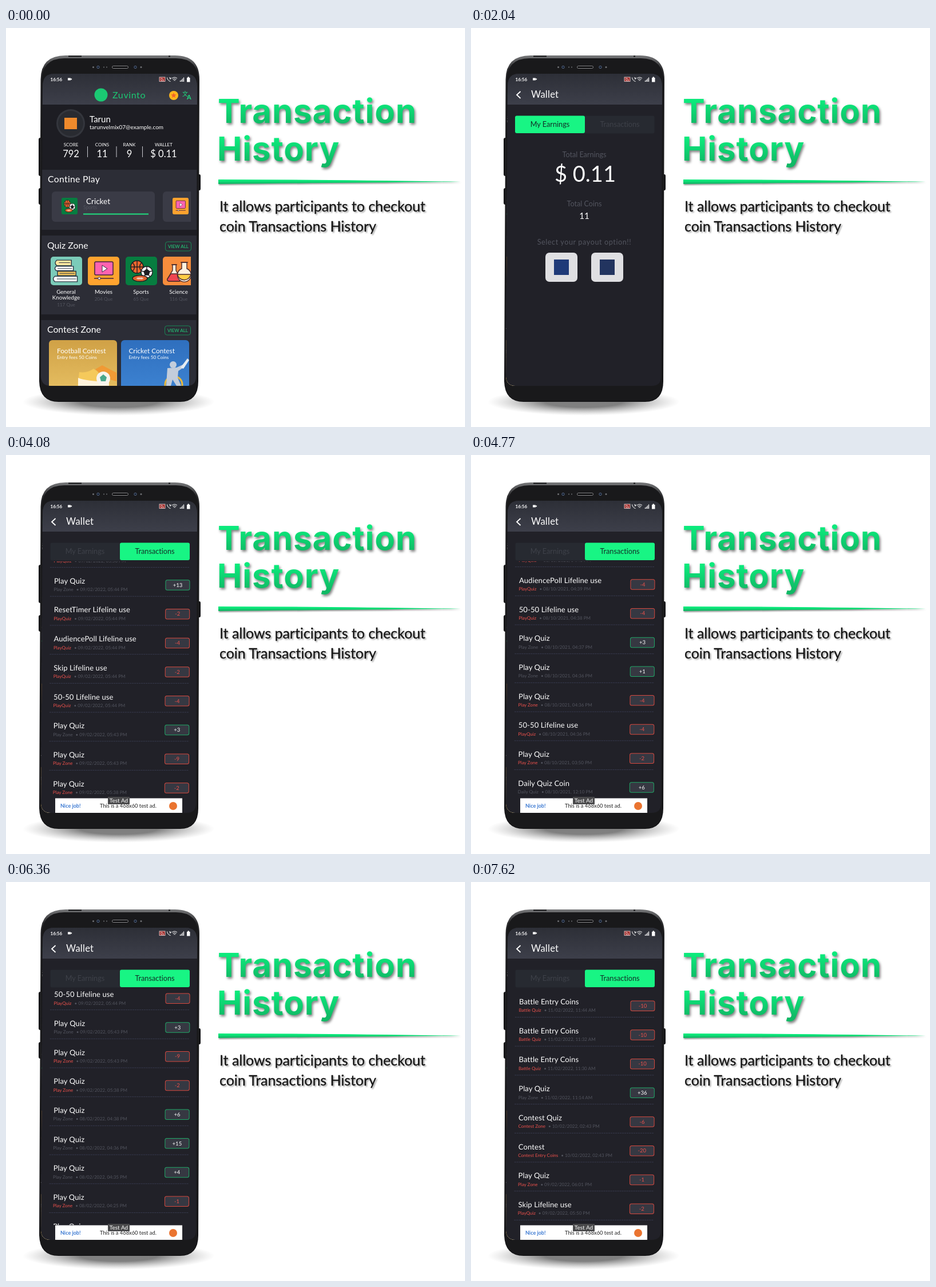
Recreate the animation shown at these times as an HTML page. Size 802 by 698 pixels, loop 8000 ms.

```html
<!DOCTYPE html>
<html lang="en">
<head>
<meta charset="utf-8">
<title>Transaction History</title>
<style>
html, body { margin: 0; width: 100%; height: 100%; overflow: hidden; background: #fff; }
svg { display: block; width: 100%; height: 100%; }
text { font-family: Lato, "Open Sans", sans-serif; font-variant-ligatures: none; fill: #fff; white-space: pre; }
.mid { text-anchor: middle; }
.dim { fill: #53555f; }
.red { fill: #ea514c; }
.title { font: 700 58px Inter, sans-serif; letter-spacing: 1px; fill: url(#green); filter: drop-shadow(2px 3px 2px rgba(0,0,0,.5)); }
.lead { font-size: 24.9px; fill: #151515; stroke: #151515; stroke-width: .3; filter: drop-shadow(2px 2px 1px rgba(0,0,0,.35)); }
.head { font-size: 15.8px; }
.view { fill: none; stroke: #1a8654; }
.row { font-size: 13px; letter-spacing: .1px; }
.sub { font-size: 8px; }
</style>
</head>
<body>
<svg viewBox="0 0 802 698">
<defs>
  <linearGradient id="green" x2="0" y2="1"><stop offset=".25" stop-color="#0cea7c"/><stop offset=".85" stop-color="#10b965"/></linearGradient>
  <linearGradient id="bar" x2="0" y2="1"><stop stop-color="#2d2f37"/><stop offset="1" stop-color="#3d3f4a"/></linearGradient>
  <linearGradient id="rim" x2="0" y2="1"><stop stop-color="#77787a"/><stop offset=".04" stop-color="#2b2b2d"/><stop offset="1" stop-color="#111113"/></linearGradient>
  <linearGradient id="gold" x2="0" y2="1"><stop stop-color="#d0a146"/><stop offset="1" stop-color="#e6bf62"/></linearGradient>
  <linearGradient id="blue" x2="0" y2="1"><stop stop-color="#2f6fbe"/><stop offset="1" stop-color="#3d83d2"/></linearGradient>
  <radialGradient id="shade"><stop offset=".4" stop-color="#555" stop-opacity=".75"/><stop offset=".75" stop-color="#777" stop-opacity=".3"/><stop offset="1" stop-color="#999" stop-opacity="0"/></radialGradient>
  <clipPath id="screen"><path d="M64 102Q64 80 84 80H314Q334 80 334 102L332 610Q332 626 316 626H78Q62 626 61 610Z"/></clipPath>
  <clipPath id="listBox"><path d="M60 186H336V600H60Z"/></clipPath>
  <clipPath id="inner"><path d="M60 80H323V626H60Z"/></clipPath>
  <symbol id="film" viewBox="0 0 55 50" preserveAspectRatio="none">
    <rect width="55" height="50" rx="5" fill="#ffa32f"/>
    <rect x="12" y="9" width="32" height="23" rx="2" fill="#ff63b0" stroke="#3b2140" stroke-width="1.5"/>
    <path d="M25 15L34 21L25 27Z" fill="#fff" stroke="#3b2140"/>
    <path d="M11 38H45" stroke="#3b2140" stroke-width="1.6"/><circle cx="20" cy="38" r="2.2" fill="#fff" stroke="#3b2140"/>
  </symbol>
  <symbol id="sport" viewBox="0 0 55 50" preserveAspectRatio="none">
    <rect width="55" height="50" rx="5" fill="#077d40"/>
    <g stroke="#1e1d22" stroke-width="1.4">
      <circle cx="20" cy="18" r="11" fill="#f0672e"/><path d="M9 18H31M20 7V29M12 10Q19 18 12 26M28 10Q21 18 28 26" fill="none"/>
      <circle cx="37" cy="27" r="10" fill="#fff"/><path d="M37 22L42 26L40 32H34L32 26ZM37 17V22M47 25L42 26M43 35L40 32M31 35L34 32M27 25L32 26" fill="#1e1d22"/>
      <ellipse cx="25" cy="38" rx="13" ry="5.5" fill="#e0642f"/><path d="M19 38H31M22 36V40M25 36V40M28 36V40" stroke="#fff" stroke-width="1"/>
    </g>
  </symbol>
</defs>

<ellipse cx="197" cy="654" rx="168" ry="24" fill="url(#shade)"/>
<path d="M57 195q0-3 3-3h3v67h-3q-3 0-3-3ZM57 283q0-3 3-3h3v29h-3q-3 0-3-3ZM336 256h2q2 0 2 3v22q0 3-2 3h-2Z" fill="#161618"/>
<path d="M60.500 90Q61 48 104 48H295Q338 48 338 90L336 618Q336 654 304 654H92Q59 654 58 618Z" fill="url(#rim)"/>
<path d="M61.500 96Q62 53 102 53H297Q337 53 337 96L335 618Q335 653 304 653H92Q60 653 59 618Z" fill="#19191b"/>
<path d="M109 49.500H132M284 49.500H287" stroke="#18181a" stroke-width="2"/>
<rect x="185.500" y="66.500" width="28" height="4" rx="2" fill="#0b0b0d" stroke="#8c8c8e"/>
<g fill="#101a2c" stroke="#5b6b86"><circle cx="161" cy="68.500" r="2.200"/><circle cx="226" cy="68.500" r="2.200"/></g>
<g fill="#707174"><circle cx="152.500" cy="68.500" r="1.500"/><circle cx="171" cy="68.500" r="1"/><circle cx="176" cy="68.500" r="1"/><circle cx="236" cy="68.500" r="1.500"/></g>

<g clip-path="url(#screen)">
  <g id="home">
    <path d="M60 80H336V626H60Z" fill="#1d1d23"/>
    <path d="M60 80H336V134H60Z" fill="url(#bar)"/>
    <path d="M60 248H336V353H60ZM60 363H336V501H60ZM60 511H336V626H60Z" fill="#2c2d36"/>
    <circle cx="166" cy="117" r="11.500" fill="#1bc873"/>
    <text x="186" y="122.500" font-size="16" letter-spacing=".6" style="fill:#1bc873">Zuvinto</text>
    <circle cx="293" cy="118" r="8" fill="#ffb61c"/>
    <path id="star" fill="#f0622b"/>
    <text x="308" y="119" font-size="10" style="fill:#1fdc7f;font-family:'Noto Sans CJK SC','Noto Sans CJK JP',sans-serif">文</text>
    <text x="316" y="125" font-size="11" font-weight="700" style="fill:#1fdc7f">A</text>
    <circle cx="113" cy="167" r="25" fill="#34363d"/><circle cx="113" cy="167" r="22" fill="#292b31"/>
    <rect x="102" y="157" width="22" height="20" fill="#ef8a2c"/>
    <text x="146" y="165" font-size="15">Tarun</text>
    <text x="146" y="177" font-size="10">tarunvelmix07@example.com</text>
    <g id="stats"></g>
    <path d="M142.500 207V226M193 207V226M238.500 207V226" stroke="#c9cad0"/>
    <text x="73" y="270" class="head" letter-spacing=".3">Contine Play</text>
    <g clip-path="url(#inner)">
      <rect x="80" y="286" width="180" height="53" rx="6" fill="#3a3b46"/>
      <rect x="274" y="286" width="90" height="53" rx="6" fill="#3a3b46"/>
      <use href="#sport" x="97" y="297" width="28" height="29"/>
      <use href="#film" x="291" y="297" width="28" height="29"/>
    </g>
    <text x="140" y="308" font-size="13.500">Cricket</text>
    <text x="135" y="317" font-size="8.500" class="dim">Sports</text>
    <path d="M135 325.500H249" stroke="#1fe080" stroke-width="1.800"/>
    <text x="72" y="385.500" class="head">Quiz Zone</text>
    <text x="72" y="532.500" class="head">Contest Zone</text>
    <rect x="278.500" y="374" width="45" height="16" rx="4" class="view"/><text x="301" y="385" font-size="8" class="mid" style="fill:#22d47d">VIEW ALL</text>
    <rect x="277.500" y="521" width="45" height="16" rx="4" class="view"/><text x="300" y="532" font-size="8" class="mid" style="fill:#22d47d">VIEW ALL</text>
    <rect x="78" y="400" width="55" height="50" rx="5" fill="#7bcbb9"/>
    <g stroke="#2c3a45" stroke-width="1.300" fill="#fff" transform="translate(105 425) scale(1.15 1.08) translate(-105 -425.500)">
      <path d="M91 408H113V417H91Q86 412.500 91 408Z" fill="#ffe6a0"/><path d="M90 418H116V425H90Q86 421 90 418Z"/>
      <path d="M92 426H120V433H92Z" fill="#f2c45d"/><path d="M88 434H122V443H88Q83 438 88 434Z"/>
      <path d="M94 412H111M92 421.500H114M95 429.500H118M91 438.500H120" stroke-width=".9"/>
    </g>
    <use href="#film" x="143" y="400" width="55" height="50"/>
    <use href="#sport" x="209" y="400" width="55" height="50"/>
    <g clip-path="url(#inner)">
      <rect x="274" y="400" width="58" height="50" rx="5" fill="#f78d3c"/>
      <g stroke="#4a2a2c" stroke-width="1.400">
        <path d="M291 414V424L282 439Q281 443 286 443H302Q306 443 305 439L297 424V414Z" fill="#fff1de"/>
        <path d="M288 430H300L305 439Q306 443 302 443H286Q281 443 282 439Z" fill="#ef4551"/><path d="M289 414H299"/>
        <path d="M307 410V421A12 12 0 1 0 316 421V410Z" fill="#fff1de"/><path d="M300 431H323A12 12 0 0 1 300 433Z" fill="#ffce45"/><path d="M305 410H318"/>
      </g>
    </g>
    <g id="cats"></g>
    <rect x="75" y="546" width="119" height="90" rx="6" fill="url(#gold)"/>
    <rect x="201" y="546" width="119" height="90" rx="6" fill="url(#blue)"/>
    <g id="contests"></g>
    <path d="M128 602Q142 604 153 596L160 601Q164 612 180 616V626H125Z" fill="#f5c95b"/>
    <path d="M126 612Q140 618 180 619V626H126Z" fill="#fff3dc"/>
    <path d="M156 597L168 590L193 603V618L174 613Z" fill="#f09a35"/>
    <circle cx="170" cy="613" r="12" fill="#f7f4ee"/><path d="M170 606L176 611L174 618H166L164 611Z" fill="#4aa78c"/>
    <circle cx="293" cy="624" r="15" fill="none" stroke="#e9b93c" stroke-width="3"/>
    <g fill="#c3cddb"><circle cx="292" cy="589" r="6"/>
      <path d="M282 595L298 594L311 588L313 592L301 600L300 612L306 626H298L291 615L288 626H280L281 609Z"/><path d="M305 594L317 578L320 581L310 596Z" fill="#e6ecf2"/></g>
  </g>

  <g id="wallet">
    <path d="M60 80H336V626H60Z" fill="#212128"/>
    <path d="M60 80H336V134H60Z" fill="url(#bar)"/>
    <path d="M86.500 111L80 117L86.500 123" fill="none" stroke="#fff" stroke-width="1.800"/>
    <text x="105" y="122" font-size="16.500" letter-spacing=".25">Wallet</text>
    <g id="earn">
      <text x="198" y="226" font-size="12.600" class="mid dim">Total Earnings</text>
      <text x="199.500" y="269" font-size="38" class="mid">$ 0.11</text>
      <text x="198" y="311.500" font-size="12.600" class="mid dim">Total Coins</text>
      <text x="198" y="334" font-size="15" class="mid">11</text>
      <text x="198" y="379" font-size="12.600" letter-spacing=".6" class="mid dim">Select your payout option!!</text>
      <rect x="130" y="393" width="56" height="51" rx="7" fill="#dfdfe2"/><rect x="145" y="405" width="26" height="27" fill="#1f3a78"/>
      <rect x="210" y="393" width="56" height="51" rx="7" fill="#dfdfe2"/><rect x="225" y="405" width="26" height="27" fill="#22345f"/>
    </g>
    <g clip-path="url(#listBox)"><g id="slide"><g transform="matrix(1 0 -.0045 1 .95 0)"><g id="list"></g></g></g></g>
    <g id="ad">
      <path d="M86 600.500H308V626H86Z" fill="#fff"/>
      <text x="95" y="616.500" font-size="9" font-weight="700" style="fill:#3c7ad2">Nice job!</text>
      <text x="164" y="617" font-size="9.300" style="fill:#222">This is a 468x60 test ad.</text>
      <rect x="178" y="598" width="38" height="13" fill="#4a4a4c"/>
      <text x="197" y="608" font-size="10" class="mid">Test Ad</text>
      <circle cx="292" cy="614" r="7" fill="#ea7430"/>
    </g>
    <rect x="77.500" y="153.500" width="243" height="31" rx="3" fill="#272a31"/>
    <rect id="thumb" y="153.500" width="122" height="30.500" rx="3" fill="#18f584"/>
    <text id="tabA" x="138" y="173" font-size="12.700" class="mid">My Earnings</text>
    <text id="tabB" x="260" y="173" font-size="12.700" class="mid">Transactions</text>
  </g>

  <text x="77.500" y="92.500" font-size="8" font-weight="700">16:56</text>
  <path d="M108 87.500H113V91.500H108ZM113 89L115 88V91L113 90Z" fill="#fff"/>
  <rect x="268" y="86" width="10" height="7.500" fill="#a32f2d" stroke="#e7dada" stroke-width=".8"/>
  <path d="M270 88Q275 88 275 93M270 90.500Q272.500 90.500 272.500 93" fill="none" stroke="#fff" stroke-width=".8"/>
  <path d="M281.500 86.500Q282 92 287.500 93.500M285 86L288 89M288 86.500V89H285.500M290 88Q294.500 84.500 299 88M291.500 90Q294.500 87.500 297.500 90M293 92Q294.500 90.500 296 92" fill="none" stroke="#fff"/>
  <path d="M304.500 94V92M306.500 94V90.500M308.500 94V88.500M310.500 94V86.500" stroke="#fff" stroke-width="1.200"/>
  <path d="M316 87H317.500V85.500H320V87H321.500V94.500H316Z" fill="#fff"/>
</g>

<text x="370" y="166" class="title">Transaction</text>
<text x="369" y="232" class="title">History</text>
<path d="M371 265Q560 265 795 269Q560 271 371 273Z" fill="url(#green)" style="filter:drop-shadow(1px 2px 1px rgba(0,0,0,.4))"/>
<text x="373" y="321" class="lead">It allows participants to checkout</text>
<text x="373" y="356" class="lead">coin Transactions History</text>
</svg>
<script>
const $ = id => document.getElementById(id);
const text = (x, y, size, cls, s) => `<text x="${x}" y="${y}" font-size="${size}" class="${cls}">${s}</text>`;

$('star').setAttribute('d', 'M' + Array.from({ length: 10 }, (_, i) => {
  const a = i * Math.PI / 5, r = i % 2 ? 2.2 : 5;
  return [293 + r * Math.sin(a), 118 - r * Math.cos(a)];
}).join('L') + 'Z');

$('stats').innerHTML = [[113.5, 'SCORE', '792'], [168, 'COINS', '11'], [215.5, 'RANK', '9'], [275.5, 'WALLET', '$ 0.11']]
  .map(([x, label, value]) => text(x, 207, 8, 'mid', label) + text(x, 225.5, 16.5, 'mid', value)).join('');

$('cats').innerHTML = [[105, 'General', 'Knowledge', '117'], [170.5, 'Movies', '', '204'], [236, 'Sports', '', '65'], [301.5, 'Science', '', '116']]
  .map(([x, a, b, n]) => text(x, 465, 9.8, 'mid', a) + text(x, 475, 9.8, 'mid', b) +
    text(x, b ? 487 : 477, 8.2, 'mid dim', n + ' Que')).join('');

$('contests').innerHTML = [[89, 'Football'], [214.5, 'Cricket']]
  .map(([x, name]) => text(x, 568.5, 11.8, '', name + ' Contest') + text(x, 579, 8.2, '', 'Entry fees 50 Coins')).join('');

// kind: [title, category]
const kinds = {
  P: ['Play Quiz', 'Play Zone'], B: ['Battle Entry Coins', 'Battle Quiz'], W: ['Battle Winner Coins', 'Battle Quiz'],
  C: ['Contest Quiz', 'Contest Zone'], E: ['Contest', 'Contest Entry Coins'], D: ['Daily Quiz Coin', 'Daily Quiz'],
  S: ['Skip Lifeline use', 'PlayQuiz'], R: ['ResetTimer Lifeline use', 'PlayQuiz'],
  A: ['AudiencePoll Lifeline use', 'PlayQuiz'], F: ['50-50 Lifeline use', 'PlayQuiz']
};
const days = [
  ['11/02/2022', 'AM', 'B 11:44 -10,B 11:32 -10,B 11:30 -10,P 11:14 +36'],
  ['10/02/2022', 'PM', 'C 02:43 -6,E 02:43 -20'],
  ['09/02/2022', 'PM', 'P 06:01 -1,S 05:50 -2,P 05:44 +13,R 05:44 -2,A 05:44 -4,S 05:44 -2,F 05:44 -4,P 05:43 +3,P 05:43 -9,P 05:38 -2'],
  ['08/02/2022', 'PM', 'P 04:38 +6,P 04:36 +15,P 04:35 +4,P 04:25 -1,P 04:24 +3,P 04:22 -2,P 04:20 +6'],
  ['08/10/2021', 'PM', 'P 04:42 +4,P 04:41 -3,S 04:40 -2,A 04:39 -4,F 04:38 -4,P 04:37 +3,P 04:36 +1,P 04:36 -4,F 04:36 -4,P 03:50 -2,D 12:10 +6,P 12:06 -3,P 12:03 +20'],
  ['08/10/2021', 'AM', 'W 11:32 +10,B 11:31 -10,B 11:31 -10,B 11:30 -10,B 11:28 -10,P 11:28 +21']
];
const pitch = 50.7;
const rows = days.flatMap(([date, half, list]) => list.split(',').map(r => [...r.split(' '), date, half]));
$('list').innerHTML = rows.map(([kind, time, coins, date, half], i) => {
  const [title, cat] = kinds[kind], loss = coins[0] === '-';
  return `<g transform="translate(0 ${209.5 + i * pitch})">
    <text x="84" y="4.5" class="row">${title}</text>
    <text x="83.500" y="18" class="sub"><tspan class="${loss ? 'red' : 'dim'}">${cat}</tspan><tspan dx="5" class="dim">• ${date}, ${time} ${half}</tspan></text>
    <rect x="279" y="-1.500" width="42" height="17.500" rx="3" fill="#363842" stroke="${loss ? '#d6493f' : '#20a867'}"/>
    <text x="300" y="10.500" font-size="9.500" class="mid ${loss ? 'red' : ''}">${coins}</text>
    <path d="M77 27H321" stroke="#3d4057" stroke-width=".8" stroke-dasharray="3 1"/></g>`;
}).join('');

// scroll keys: time, offset, speed
const keys = [[3720, 0, 0], [4080, 8 * pitch - 12, 1.25], [4770, 26 * pitch - 11, 1.2], [5250, 34 * pitch - 2, 0],
  [5610, 34 * pitch - 2, 0], [6360, 12 * pitch + 14, -1.1], [7380, 0, 0]];

function scrollAt(t) {
  const i = keys.findIndex(k => k[0] > t);
  if (i < 1) return 0;
  const [t0, a, va] = keys[i - 1], [t1, b, vb] = keys[i], d = t1 - t0, u = (t - t0) / d;
  return a + (b - a) * u * u * (3 - 2 * u) + d * u * (1 - u) * (va * (1 - u) - vb * u);
}
const ease = (t, start, length) => 1 - (1 - Math.min(1, Math.max(0, (t - start) / length))) ** 3;
const shift = (id, x, y = 0) => $(id).setAttribute('transform', `translate(${x} ${y})`);
const tabColor = k => `rgb(${62 - 44 * k},${65 - 17 * k},${73 - 33 * k})`;
const width = 274;

function draw(now) {
  const t = now % 8000, page = ease(t, 1600, 380), tab = ease(t, 2660, 320);
  shift('home', -page * width / 3);
  shift('wallet', (1 - page) * width);
  shift('earn', -tab * width);
  shift('slide', (1 - tab) * width);
  shift('ad', (1 - tab) * width);
  shift('list', 0, -scrollAt(t));
  $('thumb').setAttribute('x', 77 + tab * 122);
  $('tabA').style.fill = tabColor(1 - tab);
  $('tabB').style.fill = tabColor(tab);
  requestAnimationFrame(() => draw(performance.now() - begin));
}
const begin = performance.now();
draw(0);
</script>
</body>
</html>
```
